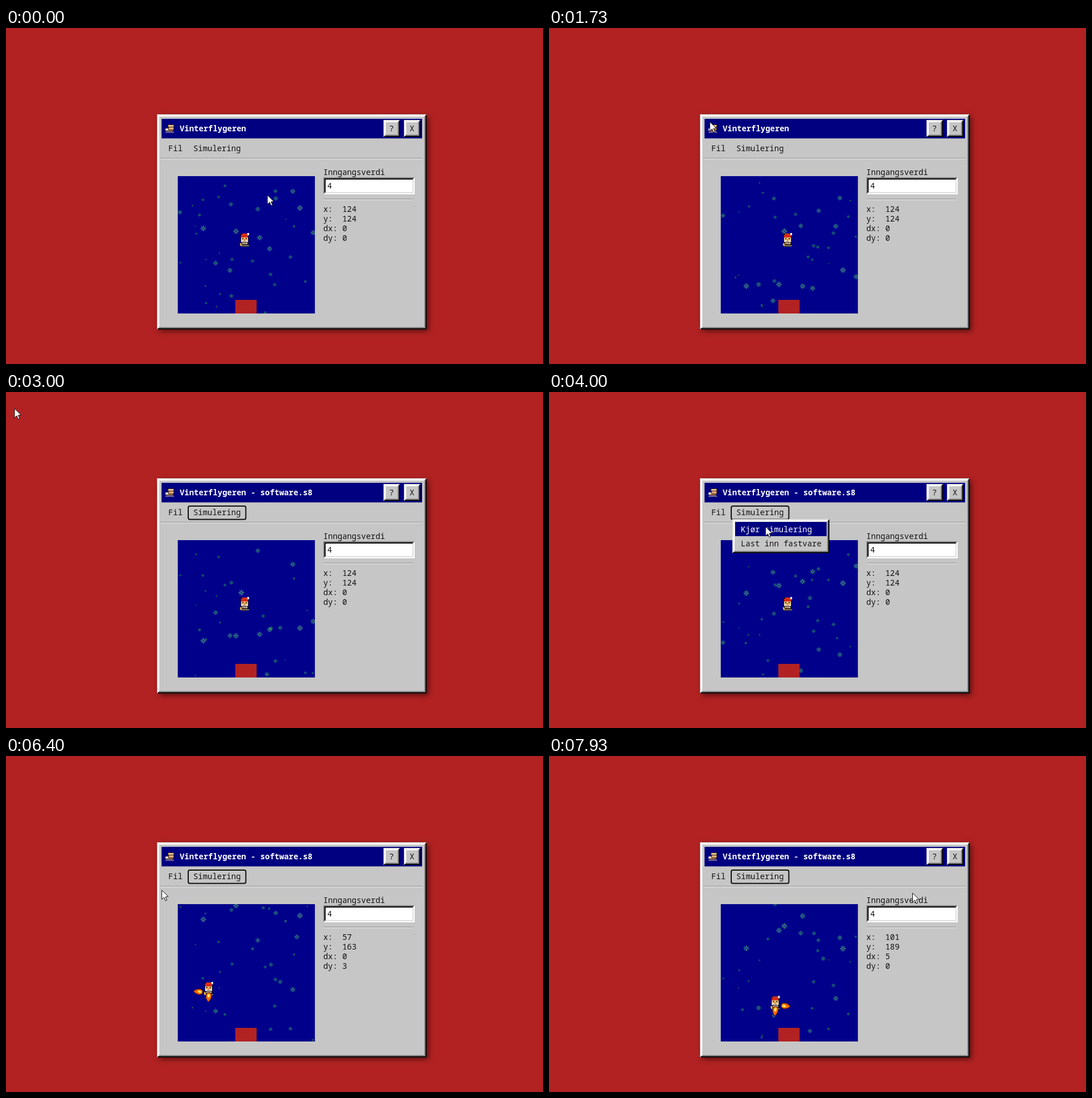
Animation of 946x592 px, one loop 8 s. Source, as an HTML page with a canvas:

```html
<!DOCTYPE html>
<html lang="no">
<head>
<meta charset="utf-8">
<title>Vinterflygeren</title>
<style>
html, body { margin: 0; width: 100%; height: 100%; overflow: hidden; background: #b22222; }
canvas { display: block; }
</style>
</head>
<body>
<canvas id="stage" width="946" height="592"></canvas>
<script>
const ctx = document.getElementById('stage').getContext('2d');
const LOOP = 8000, RATE = 15;
const GREY = '#c6c6c6', NAVY = '#000080', NIGHT = '#00008b', RED = '#b22222', INK = '#111';
const MONO = '13.93px "Noto Sans Mono", monospace';
const UI = '11.5px "Open Sans", sans-serif';
const FIELD = { x: 302.4, y: 261, size: 242, scale: 242 / 256 };

// Moments of the story, in seconds.
const DIALOG = [1.95, 2.95], FIRST_MENU = [.75, 1.3], SECOND_MENU = [3.6, 4.19];
const LOADED = 3, START = SECOND_MENU[1], TICK = 2 / RATE;

// Pointer stops: time, x, y.
const POINTER = [
  [0, 460, 294], [.6, 372, 214], [1.2, 395, 262], [1.73, 285, 166], [2.2, -20, 10], [2.95, -20, 10],
  [3.5, 360, 217], [3.9, 381, 237], [5.4, 381, 237], [6.4, 274, 236], [7, 306, 226], [7.5, 450, 191], [7.93, 640, 241]
];

// Flight path: tick, position and velocity.
const FLIGHT = [
  { n: 0, x: 124, y: 124, dx: -10, dy: 0 },
  { n: 8, x: 69, y: 144, dx: -3, dy: 2 },
  { n: 16, x: 57, y: 163, dx: 0, dy: 3 },
  { n: 28, x: 101, y: 189, dx: 5, dy: 0 }
];

let seed = 24;
const random = () => (seed = (seed * 16807) % 2147483647) / 2147483647;
const SNOW_HEIGHT = 336.6, MAX_SPEED = 262;
const FLAKES = Array.from({ length: 50 }, (_, i) => ({
  x: random() * FIELD.size,
  y: random() * SNOW_HEIGHT,
  depth: .12 + .88 * (i + 1) / 50
}));

const between = (t, [a, b]) => t >= a && t < b;

function rect(x, y, w, h, color) {
  ctx.fillStyle = color;
  ctx.fillRect(x, y, w, h);
}

function text(str, x, y, { color = INK, font = MONO, align = 'left' } = {}) {
  ctx.fillStyle = color;
  ctx.font = font;
  ctx.textAlign = align;
  ctx.fillText(str, x, y);
}

function polygon(points, fill, stroke) {
  ctx.beginPath();
  points.forEach(([x, y]) => ctx.lineTo(x, y));
  ctx.closePath();
  ctx.fillStyle = fill;
  ctx.fill();
  if (!stroke) return;
  ctx.strokeStyle = stroke;
  ctx.lineWidth = 1;
  ctx.stroke();
}

function bevel(x, y, w, h, upper, lower, fill) {
  const b = 2;
  rect(x, y, w, h, lower);
  polygon([[x, y], [x + w, y], [x + w - b, y + b], [x + b, y + h - b], [x, y + h]], upper);
  rect(x + b, y + b, w - 2 * b, h - 2 * b, fill);
}

function raised(x, y, w, h) {
  bevel(x, y, w, h, '#e4e4e4', '#0a0a0a', GREY);
  bevel(x + 2, y + 2, w - 4, h - 4, '#fff', '#808080', GREY);
}

function sunken(x, y, w, h) {
  bevel(x, y, w, h, '#808080', '#fff', '#fff');
  bevel(x + 2, y + 2, w - 4, h - 4, '#0a0a0a', '#dfdfdf', '#fff');
}

function withShadow(color, blur, offset, draw) {
  ctx.save();
  Object.assign(ctx, { shadowColor: color, shadowBlur: blur, shadowOffsetX: offset, shadowOffsetY: offset });
  draw();
  ctx.restore();
}

function rule(x, y, w) {
  rect(x, y, w, 1, '#8c8c8c');
  rect(x, y + 1, w, 1, '#f4f4f4');
}

function sledIcon(x, y) {
  rect(x + 4, y, 11, 10, '#3a2415');
  rect(x + 5, y + 1, 9, 3, '#e9c49a');
  rect(x + 6, y + 5, 8, 4, '#d9a878');
  rect(x, y + 7, 5, 4, '#f3e3c8');
  rect(x + 2, y + 10, 11, 2, '#a9743f');
  rect(x, y + 13, 15, 1, '#e8d5b0');
}

function drawWindow(loaded) {
  withShadow('rgba(0,0,0,.55)', 9, 3, () => rect(267, 153, 474, 378, '#000'));
  raised(266, 152, 475, 379);
  rect(274, 160, 459, 34.5, NAVY);
  sledIcon(281, 170);
  text('Vinterflygeren' + (loaded ? ' - software.s8' : ''), 306, 182, { color: '#fff', font: 'bold ' + MONO });
  [[665, '?'], [701, 'X']].forEach(([x, label]) => {
    raised(x, 162, 29, 30);
    text(label, x + 14.3, 182, { align: 'center' });
  });
  text('Fil', 286, 217);
  text('Simulering', 330, 217);
  rule(272, 229, 462);
  text('Inngangsverdi', 559, 259);
  sunken(559, 263, 161, 30);
  text('4', 566, 283);
  rule(559, 301, 159);
}

function drawFlake(x, y, depth) {
  const r = depth * 5;
  ctx.strokeStyle = `hsl(128, 62%, ${30 + 34 * depth}%)`;
  ctx.lineWidth = Math.max(.6, r * .2);
  ctx.beginPath();
  for (let i = 0; i < 8; i++) {
    const c = Math.cos(i * Math.PI / 4), s = Math.sin(i * Math.PI / 4);
    ctx.moveTo(x + c * r * .25, y + s * r * .25);
    ctx.lineTo(x + c * r, y + s * r);
  }
  ctx.stroke();
}

// The tip points along the angle; the core stays near the sledge.
function flame(x, y, angle) {
  const drop = (w, h, color) => {
    ctx.beginPath();
    ctx.moveTo(w, 1);
    ctx.bezierCurveTo(w * .4, h * 1.2, -w, h * 1.3, -w, 0);
    ctx.bezierCurveTo(-w, -h * 1.3, w * .3, -h * 1.2, w, 1);
    ctx.fillStyle = color;
    ctx.fill();
  };
  ctx.save();
  ctx.translate(x, y);
  ctx.rotate(angle);
  drop(8.5, 5.8, '#4a1606');
  drop(7.6, 4.8, '#f0640c');
  ctx.translate(-2.5, 0);
  drop(4.2, 3, '#ffb020');
  drop(2.3, 1.7, '#fff27a');
  ctx.restore();
}

function drawRider(cx, top) {
  const part = (x, y, w, h, color) => rect(cx + x, top + y, w, h, color);
  const pair = (x, y, w, h, color) => { part(-x - w, y, w, h, color); part(x, y, w, h, color); };
  part(-7, 1, 14, 23, '#1c110c');
  part(-6, 3, 12, 5, '#dc2a18');
  part(-4, 1, 9, 2, '#f0391f');
  part(5, 0, 3, 4, '#fff');
  part(-6, 8, 12, 8, '#f3ead8');
  part(-5, 8, 10, 5, '#f6bf62');
  pair(2, 9, 2, 2, '#1c110c');
  part(-1, 11, 2, 2, '#d9542c');
  part(-3, 14, 6, 1, '#8a6a4a');
  part(-4, 17, 9, 3, '#c9b8a2');
  pair(1, 18, 1, 3, '#4a3526');
  part(-8, 18, 3, 4, '#e7b53f');
  part(-7, 22, 15, 1, '#f0d9a4');
}

// Cubic path through the flight points, with its rounded slope as velocity.
function flightAt(n) {
  const i = Math.max(1, FLIGHT.findIndex(p => p.n >= n));
  const a = FLIGHT[i - 1], b = FLIGHT[i], span = b.n - a.n, k = (n - a.n) / span;
  const along = (p, d) => {
    const way = b[p] - a[p], v0 = a[d] * span, v1 = b[d] * span;
    const c2 = 3 * way - 2 * v0 - v1, c3 = v0 + v1 - 2 * way;
    return [a[p] + k * (v0 + k * (c2 + k * c3)), (v0 + k * (2 * c2 + 3 * k * c3)) / span].map(Math.round);
  };
  const [x, dx] = along('x', 'dx'), [y, dy] = along('y', 'dy');
  return n > 0 ? { x, y, dx, dy } : { x, y, dx: 0, dy: 0 };
}

function drawField(t) {
  const ticks = Math.max(0, Math.min(28, Math.floor((t - START) / TICK)));
  const state = flightAt(ticks);
  const { x: left, y: upper, size, scale } = FIELD;

  ctx.save();
  ctx.beginPath();
  ctx.rect(left, upper, size, size);
  ctx.clip();
  rect(left, upper, size, size, NIGHT);
  for (const { x, y, depth } of FLAKES)
    drawFlake(left + x, upper - 10 + (y + depth * MAX_SPEED * t) % SNOW_HEIGHT, depth);
  rect(404, 479, 37.5, 24, RED);
  const cx = left + state.x * scale + .6, top = upper + state.y * scale - 17;
  drawRider(cx, top);
  if (ticks > 0) {
    const side = ticks < 22 ? -1 : 1;
    flame(cx + side * 18.5, top + 17.5, side < 0 ? Math.PI : 0);
    flame(cx + .5, top + 27, Math.PI / 2);
  }
  ctx.restore();

  Object.keys(state).sort((a, b) => a.length - b.length).forEach((name, i) => {
    text(name + ':', 559, 324 + 17 * i);
    text(state[name], 592.5, 324 + 17 * i);
  });
}

function drawMenu(pointerY) {
  raised(323, 224, 171, 60);
  ['Kjør simulering', 'Last inn fastvare'].forEach((label, i) => {
    const y = 229 + 25 * i, hot = between(pointerY, [y, y + 25]);
    if (hot) rect(328, y, 161, 25, NAVY);
    text(label, 338, y + 18, { color: hot ? '#fff' : INK });
  });
}

function drawFocus() {
  ctx.beginPath();
  ctx.roundRect(321, 201, 101.5, 23.5, 3);
  ctx.strokeStyle = INK;
  ctx.lineWidth = 2;
  ctx.stroke();
}

function chevron(x, y) {
  ctx.strokeStyle = '#444';
  ctx.lineWidth = 1.1;
  ctx.beginPath();
  ctx.moveTo(x - 4, y - 2);
  ctx.lineTo(x, y + 2);
  ctx.lineTo(x + 4, y - 2);
  ctx.stroke();
}

function drawDialog() {
  const box = (x, y, w, h, fill, edge, line = 1) => {
    rect(x, y, w, h, edge);
    rect(x + line, y + line, w - 2 * line, h - 2 * line, fill);
  };
  withShadow('rgba(0,0,0,.4)', 9, 2, () => rect(-20, -20, 591, 330, '#b42cb4'));
  rect(0, 0, 570, 237, '#fff');
  rect(0, 237, 570, 72, '#f0f0f0');
  box(-80, -4, 124, 23, '#cce8ff', '#99d1ff');
  text('software.s8', 22, 13, { font: UI, align: 'right' });
  box(-80, 246, 444, 23, '#fff', '#0078d7');
  chevron(355, 258);
  box(375, 246, 178, 22, '#e1e1e1', '#adadad');
  text('All Files (*.*)', 379, 261, { font: UI });
  chevron(545, 257);
  box(376, 274, 82, 23, '#e1e1e1', '#0078d7', 2);
  text('Open', 416.5, 290, { font: UI, align: 'center' });
  box(471, 274, 82, 23, '#e1e1e1', '#adadad');
  text('Cancel', 512, 290, { font: UI, align: 'center' });
  for (let i = 0; i < 3; i++)
    for (let j = 2 - i; j < 3; j++) rect(560 + 3 * i, 300 + 3 * j, 2, 2, '#bfbfbf');
}

function pointerAt(t) {
  const next = POINTER.findIndex(stop => stop[0] > t);
  const i = next < 0 ? POINTER.length - 1 : next;
  const [t0, x0, y0] = POINTER[i - 1], [t1, x1, y1] = POINTER[i];
  const k = Math.min(1, (t - t0) / (t1 - t0));
  return [x0 + (x1 - x0) * k, y0 + (y1 - y0) * k];
}

function drawPointer(x, y) {
  const shape = [[0, 0], [0, 16], [4, 12.5], [6.5, 18.5], [9, 17.4], [6.5, 11.6], [11.5, 11.3]];
  polygon(shape.map(([dx, dy]) => [x + .5 + dx, y + .5 + dy]), '#fff', INK);
}

function draw(t) {
  const [px, py] = pointerAt(t);
  rect(0, 0, 946, 592, RED);
  drawWindow(t >= LOADED);
  drawField(t);
  if (between(t, FIRST_MENU) || t >= LOADED) drawFocus();
  if (between(t, FIRST_MENU) || between(t, SECOND_MENU)) drawMenu(py + 3);
  if (between(t, DIALOG)) drawDialog();
  drawPointer(px, py);
}

function loop() {
  const ms = (performance.now() + 4) % LOOP;
  draw(Math.floor(ms * RATE / 1000) / RATE);
  requestAnimationFrame(loop);
}
loop();
</script>
</body>
</html>
```
